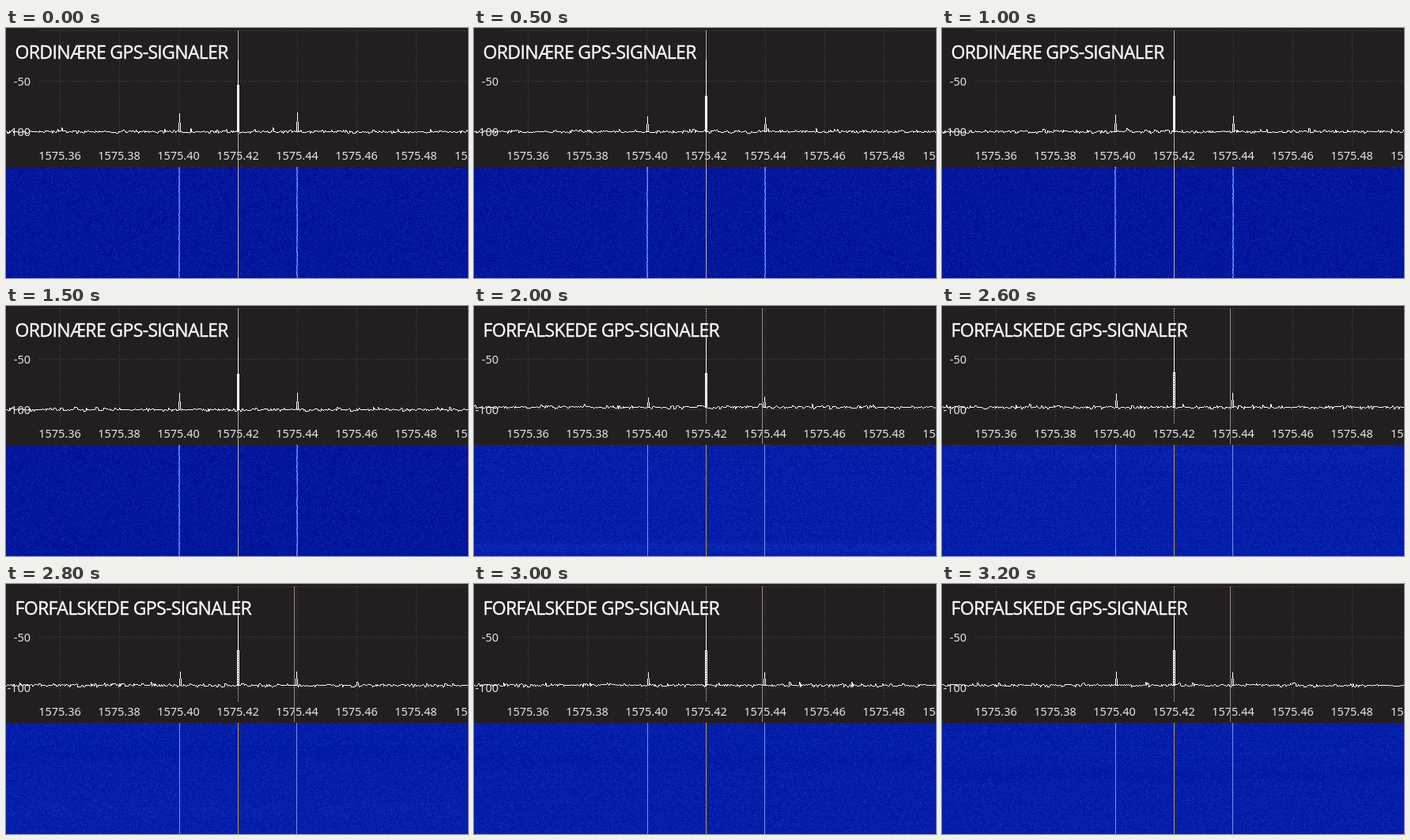
Recreate the animation shown at these times as an HTML page with a canvas. Size 584 by 317 pixels, loop 3.4 s.

```html
<!DOCTYPE html>
<html lang="da">
<head>
<meta charset="utf-8">
<title>GPS-signaler</title>
<style>
  html, body { margin: 0; width: 100%; height: 100%; overflow: hidden; background: #231f20; }
  svg, canvas { position: absolute; left: 0; top: 0; width: 584px; height: 317px; }
  .grid { stroke: #4d494b; stroke-dasharray: 1 2; shape-rendering: crispEdges; }
  .label { font: 14.5px "Noto Sans", "Open Sans", sans-serif; fill: #e6e4e5; }
  .title { font: 23px "Open Sans", "Noto Sans", sans-serif; letter-spacing: -.65px; fill: #fff; stroke: #fff; stroke-width: .35px; }
</style>
</head>
<body>
<svg id="axes" viewBox="0 0 584 317"></svg>
<canvas id="plot" width="584" height="317"></canvas>
<svg viewBox="0 0 584 317"><text id="title" class="title" x="11.5" y="39"></text></svg>
<script>
const W = 584, H = 317, FALL = 176, LOOP = 3400, CENTER = 293;
const axes = document.getElementById('axes');
const title = document.getElementById('title');
const ctx = document.getElementById('plot').getContext('2d');

// bumps: small extra peaks as [x, height]; bands: waterfall rows as [y, spread, gain]
const steps = [
  { at: 0,    base: 131, left: 108, right: 107, mid: 72, bumps: [[70, 5], [337, 5]] },
  { at: 500,  base: 131, left: 112, right: 113, mid: 86, bumps: [[183, 3], [455, 3]] },
  { at: 1000, base: 131, left: 110, right: 111, mid: 86, bumps: [[127, 3], [410, 3]] },
  { at: 1500, base: 131, left: 110, right: 110, mid: 86, bumps: [[113, 3], [470, 3]] },
  { at: 2000, base: 128, left: 116, right: 115, mid: 85, bumps: [[139, 4], [360, 4]], bands: [[306, 6, .4]] },
  { at: 2400, base: 129, left: 110, right: 109, mid: 85, bumps: [[172, 4], [270, 4]], bands: [[200, 8, .25], [270, 12, -.15]] },
  { at: 2600, base: 128, left: 111, right: 110, mid: 84, bumps: [[110, 4], [415, 4]], bands: [[190, 8, .2]] },
  { at: 2800, base: 128, left: 111, right: 111, mid: 84, bumps: [[183, 4], [443, 4]], bands: [[213, 10, -.25], [290, 14, .15]] },
  { at: 3000, base: 128, left: 112, right: 112, mid: 84, bumps: [[90, 3], [398, 4]], bands: [[225, 10, -.2]] },
  { at: 3200, base: 128, left: 111, right: 112, mid: 84, bumps: [[257, 4], [443, 3]], bands: [[241, 10, -.2]] }
];

function random(seed) {
  let s = seed * 2654435761 >>> 0;
  return () => {
    s = s + 0x6D2B79F5 | 0;
    let t = Math.imul(s ^ s >>> 15, 1 | s);
    t = t + Math.imul(t ^ t >>> 7, 61 | t) ^ t;
    return ((t ^ t >>> 14) >>> 0) / 4294967296;
  };
}

function label(x, y, anchor, text) {
  return `<text class="label" x="${x}" y="${y}" text-anchor="${anchor}">${text}</text>`;
}

function buildAxes() {
  let out = '';
  for (const y of [3.5, 67.5, 131.5]) out += `<path class="grid" d="M42 ${y}H584"/>`;
  for (let i = 0; i < 7; i++) {
    const x = 68 + 75 * i;
    out += `<path class="grid" d="M${x + .5} 3V150"/>` +
      label(x, 167, 'middle', (1575.36 + .02 * i).toFixed(2));
  }
  out += label(567, 167, 'start', '15') + label(31, 73, 'end', '-50') + label(31, 137, 'end', '-100');
  axes.innerHTML = out;
}

// One-pixel column, optionally broken into dashes of two pixels every three.
function column(x, y0, y1, color, dashed = false) {
  ctx.fillStyle = color;
  if (!dashed) return ctx.fillRect(x, y0, 1, y1 - y0);
  for (let y = y0; y < y1; y += 3) ctx.fillRect(x, y, 1, Math.min(2, y1 - y));
}

function waterfall(step, spoofed, rnd) {
  const image = ctx.createImageData(W, H - FALL);
  const [r, g, b] = spoofed ? [5, 30, 170] : [2, 22, 156];
  let p = 0;
  for (let y = FALL; y < H; y++) {
    let row = spoofed ? (rnd() - .5) * .2 : 0;
    for (const [c, s, gain] of step.bands || []) row += gain * Math.exp(-(((y - c) / s) ** 2));
    for (let x = 0; x < W; x++) {
      let n = (rnd() + rnd() + rnd() - 1.5) * .8 + row;
      if (rnd() > .97) n += 1.2;
      image.data[p++] = r + 10 * n;
      image.data[p++] = g + 14 * n;
      image.data[p++] = b + 18 * n;
      image.data[p++] = 255;
    }
  }
  ctx.putImageData(image, 0, FALL);
}

function carriers(spoofed, rnd) {
  if (spoofed) {
    for (const x of [219, 367]) column(x, FALL, H, '#7390f8');
    for (const x of [CENTER - 1, CENTER + 1]) column(x, FALL, H, 'rgba(45,45,60,.55)');
    column(CENTER, FALL, H, '#a08a4c');
    column(CENTER, FALL, H, '#bca25a', true);
    return;
  }
  for (const x of [218, 367]) {
    for (let y = FALL; y < H; y++) {
      const k = rnd();
      ctx.fillStyle = `rgba(100,150,255,${.25 + .4 * rnd()})`;
      ctx.fillRect(x, y, 2, 1);
      ctx.fillStyle = `rgb(${80 + 50 * k},${130 + 50 * k},255)`;
      ctx.fillRect(x + (rnd() > .45 ? 1 : 0), y, 1, 1);
    }
  }
}

// A narrow peak whose lower half splits into two legs.
function spike(x, top, base) {
  const split = Math.round((top + base) / 2);
  column(x, top, split, '#fff');
  column(x - 1, split, base, '#fff');
  column(x + 1, split, base, '#fff');
}

function trace(step, spoofed, rnd) {
  const { base, left, right, mid, bumps } = step;
  const peaks = [spoofed ? 220 : 219, CENTER, spoofed ? 367 : 368];
  let last = base, y = base;
  for (let x = 0; x < W; x++) {
    if (peaks.some(p => Math.abs(x - p) < 2)) y = base;
    else if (rnd() > .35) {
      y = base + Math.round((rnd() + rnd() - 1) * 2.2);
      if (rnd() > .96) y -= 2;
    }
    const bump = bumps.find(b => b[0] === x);
    if (bump) y = base - bump[1];
    const top = y < last ? y : Math.min(last + 1, y);
    column(x, top, Math.max(y, last - 1) + 1, '#fff');
    last = y;
  }
  spike(peaks[0], left, base);
  spike(peaks[2], right, base);
  column(CENTER, 40, mid, '#fff');
  column(CENTER - 1, mid, base, '#fff');
  column(CENTER + 1, mid, base, '#fff');
  column(CENTER, mid, base, '#fff', spoofed);
}

function draw(index) {
  const step = steps[index], spoofed = step.at >= 2000, rnd = random(index + 1);
  title.textContent = spoofed ? 'FORFALSKEDE GPS-SIGNALER' : 'ORDINÆRE GPS-SIGNALER';
  ctx.clearRect(0, 0, W, H);
  waterfall(step, spoofed, rnd);
  carriers(spoofed, rnd);
  if (spoofed) {
    column(CENTER, 3, 149, '#aaa6a6', true);
    column(364, 3, 175, '#9c8a8d');
  } else {
    column(CENTER, 3, H, '#b5b3ac');
  }
  trace(step, spoofed, rnd);
}

let shown = -1;
function tick() {
  const t = performance.now() % LOOP;
  const index = steps.filter(s => s.at <= t).length - 1;
  if (index !== shown) draw(shown = index);
  requestAnimationFrame(tick);
}

buildAxes();
tick();
</script>
</body>
</html>
```
